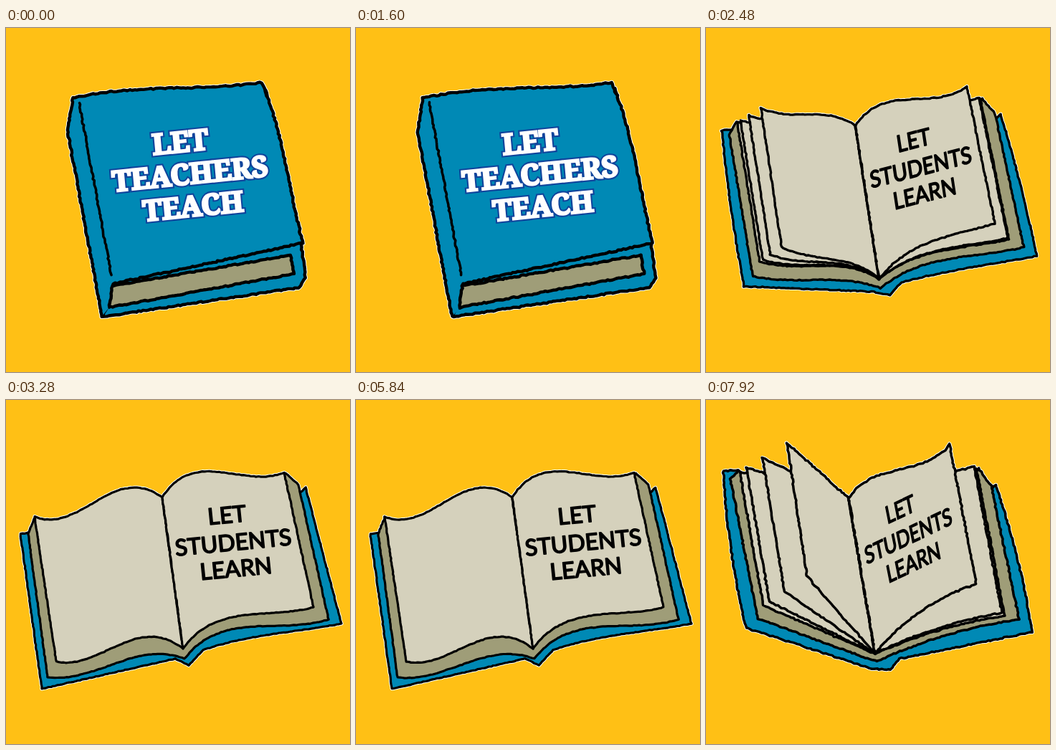
These frames come from a looping animation (480x480 px, 8000 ms). An HTML page:

```html
<!DOCTYPE html>
<html lang="en">
<head>
<meta charset="utf-8">
<title>Let teachers teach</title>
<style>
  html, body { margin: 0; width: 100%; height: 100%; overflow: hidden; background: #ffc015; }
  svg { display: block; width: 100vw; height: 100vh; }
  path { stroke: #000; stroke-linejoin: round; stroke-linecap: round; }
  .halo { fill: none; stroke: #fff; stroke-dasharray: 11 3; }
  text { text-anchor: middle; }
  .slab { font: 700 40px "Noto Serif", serif; stroke-linejoin: miter; stroke-miterlimit: 2; }
  .rim { fill: #10449c; stroke: #10449c; stroke-width: 7px; }
  .face { fill: #fff; stroke: #fff; stroke-width: 2.8px; }
  .hand { font: 400 32px Lato, sans-serif; fill: #000; stroke: #000; stroke-width: 1.7px; stroke-linejoin: round; }
</style>
</head>
<body>
<svg viewBox="0 0 480 480"><g id="book"></g></svg>
<script>
const LOOP = 8000, STEP = 112.1;
const BLUE = '#0089b5', KHAKI = '#9f9d78', CREAM = '#d5d1bc';

const clamp = v => Math.min(1, Math.max(0, v));
const mix = (a, b, t) => a + (b - a) * t;
const blend = (a, b, t) => a.map((p, i) => p.map((v, j) => mix(v, b[i][j], t)));

// Corners "x,y,bow,bow,teeth"; the last three shape the edge to the next corner
const shape = s => s.split(' ').map(c => {
  const [x, y, p = 0, q = 0, teeth = 0] = c.split(',').map(Number);
  return [x, y, p, q, teeth];
});
const pose = (from, to) => t => blend(shape(from), shape(to), t);

// shut -> lifted
const lift = {
  base: pose('134,403 410,362 418,348 410,290 362,85 300,84',
             '180,383 432,348 438,338 428,300 384,112 374,116'),
  sheets: pose('110,97 357,82 397,317 147,360',
               '200,27,.12,.12,4 370,112 420,325,-.15 253,225'),
  block: pose('147,360 397,317 402,343 143,390',
              '253,213,-.03,.19,4 420,323 417,327 186,375'),
  cover: pose('134,403 86,145 93,98,.05,-.02 357,76,.05 414,300 149,357 144,390',
              '180,383 130,150 133,146 188,-3 255,192 187,375 186,378'),
  hinge: pose('102,104 147,345', '142,157,.03,.03 183,333'),
  title: pose('.995,-.1 .09,.995 257,203', '.26,-.49 .26,.54 182,155')
};

// fanned -> flat; a sheet runs from the head of the spine round to its foot
const flatLeft = '218,136 247,347,-.32,.11 70,365 40,163,-.19,.33';
const flatRight = '218,136,.35,-.07 388,101 429,289,-.01,-.25 247,347';
const fan = {
  base: pose('45,98 24,99,-.03,-.03 56,318 232,375 258,376 270,361 455,324,-.03,-.03 404,118 240,300',
             '40,184 20,187 50,403 236,361 255,370 275,349,.05 468,312 418,122 240,300'),
  block: pose('45,98 34,110 72,305 238,365,.05,.05 437,306 398,120 380,95 240,300',
              '40,164 31,187 58,387,-.09,.18 249,361,.25,-.02 450,306 408,118 390,102 240,300'),
  leftBack: pose('199,137 236,354 80,287 47,100', flatLeft),
  leftFront: pose('199,137 236,354 141,246 113,60', flatLeft),
  rightBack: pose('199,137 374,93 413,297,-.05,-.05 236,354', flatRight),
  rightFront: pose('199,137,.19,-.15 340,62 377,257,-.1,-.1 236,354', flatRight),
  title: pose('.74,-.35 .2,1 282,189', '.995,-.095 .1,.99 317,198')
};

function random(seed) {
  let s = (seed * 2654435761) >>> 0;
  return () => {
    s = (s + 0x6D2B79F5) >>> 0;
    let r = Math.imul(s ^ s >>> 15, s | 1);
    r ^= r + Math.imul(r ^ r >>> 7, r | 61);
    return ((r ^ r >>> 14) >>> 0) / 4294967296;
  };
}

// Point on the cubic edge a-b, bowed along its normal
function along([ax, ay, p, q, teeth], [bx, by], t) {
  const dx = bx - ax, dy = by - ay, len = Math.hypot(dx, dy) || 1;
  const saw = teeth * (t * len / 13 % 1) / len;
  const off = 3 * t * (1 - t) * ((1 - t) * p + t * q) - saw;
  const s = t * t * (3 - 2 * t) * 0 + t;
  return [ax + dx * s + dy * off, ay + dy * s - dx * off];
}

// Hand-drawn line round the corners
function sketch(corners, closed, rough, rnd) {
  const line = [];
  corners.forEach((a, i) => {
    const b = corners[i + 1] || (closed ? corners[0] : a);
    const steps = Math.max(1, Math.round(Math.hypot(b[0] - a[0], b[1] - a[1]) / 3.25));
    for (let j = 0; j < steps; j++)
      line.push(along(a, b, j / steps).map(v => (v + (rnd() - .5) * rough).toFixed(1)));
  });
  return 'M' + line.join('L') + (closed ? 'Z' : '');
}

function pen(frame, width, rough) {
  let halo = '', body = '', count = 0;
  return {
    draw(corners, fill = 'none', closed = fill !== 'none') {
      const d = sketch(corners, closed, rough, random(frame * 37 + ++count));
      if (fill !== 'none') halo += `<path class="halo" d="${d}" stroke-width="${width + 2}"/>`;
      body += `<path d="${d}" fill="${fill}" stroke-width="${fill === 'none' ? width * .8 : width}"/>`;
    },
    write(matrix, lines) {
      body += `<g transform="matrix(${matrix.map(p => p.slice(0, 2))})">${lines}</g>`;
    },
    svg: () => halo + body
  };
}

const label = (style, rows) => rows.map(([word, x, y]) =>
  `<text class="${style}" x="${x}" y="${y}">${word}</text>`).join('');
const teach = [['LET', -10, -31], ['TEACHERS', 0, 14.5], ['TEACH', 0, 60]];
const learn = [['LET', -5, -27], ['STUDENTS', 0, 12], ['LEARN', 0, 49]];

const stroke = (a, b) => [a, b].map(([x, y]) => [x, y, 0, 0, 0]);

function drawLift(frame, t) {
  const { draw, write, svg } = pen(frame, mix(4.4, 3.6, t), 1.8);
  const sheets = lift.sheets(t), block = lift.block(t);
  draw(lift.base(t), BLUE);
  if (t > 0) draw(sheets, CREAM);
  draw(block, KHAKI);
  if (t === 1) for (const u of [.22, .45, .52, .68]) {
    const top = along(sheets[0], sheets[1], u + .14), edge = along(block[0], block[1], u);
    const reach = u === .52 ? .6 : 1;
    draw(stroke(top, [mix(top[0], edge[0], reach), mix(top[1], edge[1], reach)]));
    draw(stroke(edge, [mix(edge[0], block[3][0], .77), mix(edge[1], block[3][1], .77)]));
  }
  draw(lift.cover(t), BLUE, false);
  draw(lift.hinge(t));
  write(lift.title(t), label('slab rim', teach) + label('slab face', teach));
  return svg();
}

// swing: how far the left half has come down; flat: fanned to flat
function drawFan(frame, swing, flat) {
  const { draw, write, svg } = pen(frame, mix(3.5, 3.2, flat), mix(1.7, .9, flat));
  const fold = ([x, y, ...edge]) => {
    const out = Math.max(0, 236 - x);
    return [x + out * .4 * (1 - swing), y - out * .375 * (1 - swing), ...edge];
  };
  const page = (back, front, t) => draw(blend(fan[back](flat), fan[front](flat), t).map(fold), CREAM);
  draw(fan.base(flat).map(fold), BLUE);
  draw(fan.block(flat).map(fold), KHAKI);
  for (let i = flat < 1 ? 0 : 3; i < 4; i++) page('leftBack', 'leftFront', (i / 3) ** 1.8);
  for (const t of flat < 1 ? [-.1, 0, 1] : [1]) page('rightBack', 'rightFront', t);
  write(fan.title(flat), label('hand', learn));
  return svg();
}

// Shut, lifted over three steps, folded down over three, flattened over two, then fanned again
function scene(k) {
  if (k <= 18) return drawLift(k, clamp((k - 15) / 3));
  return drawFan(k, clamp((k - 18) / 3), clamp(Math.min(k - 21, 70 - k) / 2));
}

const book = document.getElementById('book');
let shown = -1;
function tick() {
  const k = Math.min(70, Math.floor((performance.now() % LOOP + 1) / STEP));
  if (k !== shown) book.innerHTML = scene(shown = k);
  requestAnimationFrame(tick);
}
tick();
</script>
</body>
</html>
```
